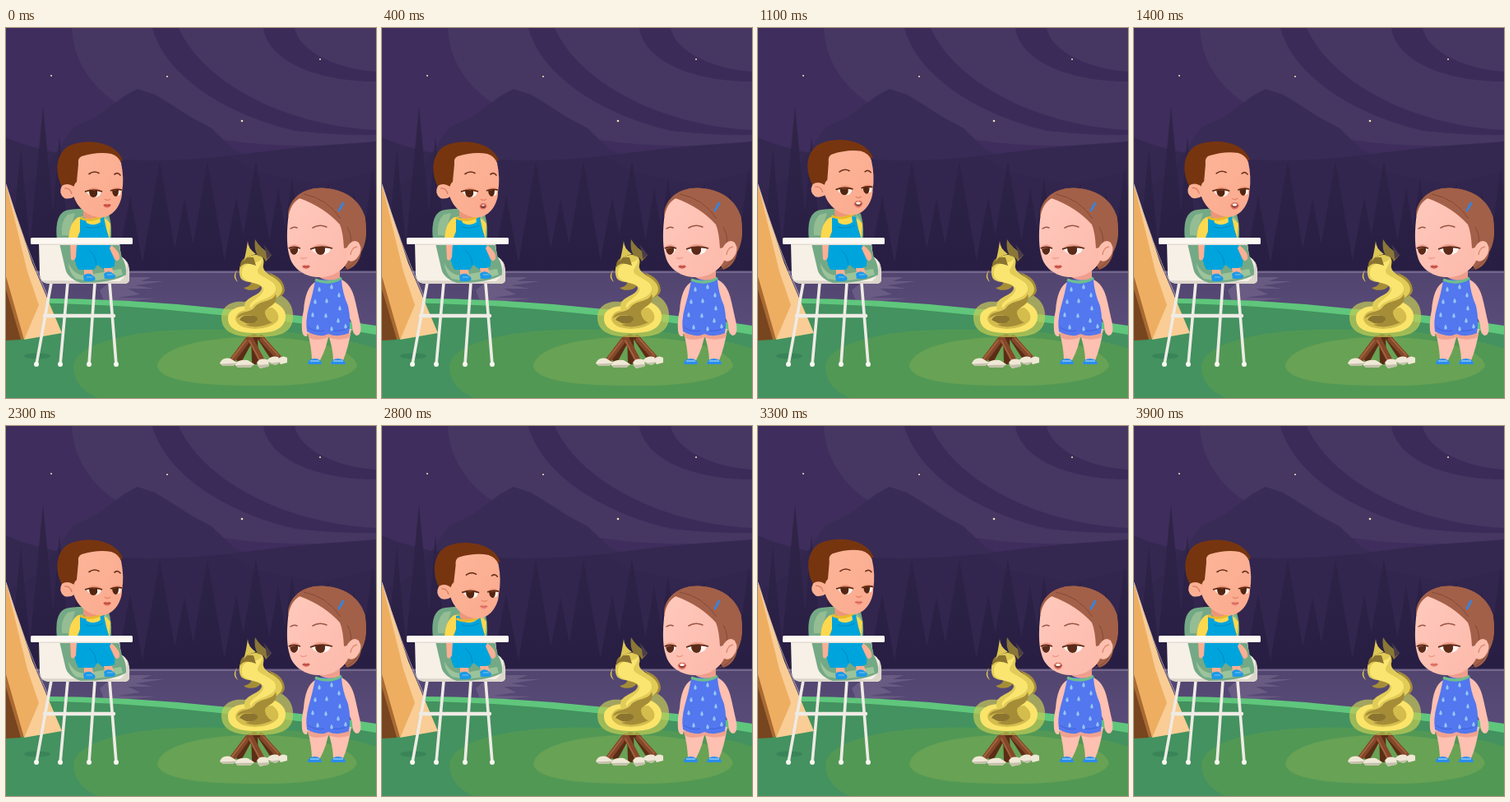
An HTML page for the animation above (4000 ms loop, 450x450 px).

```html
<!DOCTYPE html>
<html lang="en">
<head>
<meta charset="utf-8">
<title>Campfire talk</title>
<style>
html, body { margin: 0; width: 100%; height: 100%; overflow: hidden; background: #3c2d5a; }
svg { display: block; width: 100vw; height: 100vh; }
</style>
</head>
<body>
<svg viewBox="0 0 450 450">
<defs>
  <linearGradient id="haze" x2="0" y2="1"><stop stop-color="#302549"/><stop offset="1" stop-color="#281e43"/></linearGradient>
  <linearGradient id="lake" x2="0" y2="1"><stop stop-color="#51456f"/><stop offset="1" stop-color="#5c4e7d"/></linearGradient>
  <linearGradient id="boySkin" x2="1" y2="1"><stop stop-color="#fcb598"/><stop offset="1" stop-color="#fbaa8f"/></linearGradient>
  <linearGradient id="girlSkin" x2="1" y2="1"><stop stop-color="#ffc9bc"/><stop offset="1" stop-color="#fcb9aa"/></linearGradient>
  <path id="drop" d="M0-3.500C2.300 0 2.300 2.500 0 2.500S-2.300 0 0-3.500Z" fill="#94c4fb"/>
</defs>

<!-- sky -->
<path fill="#3e2d5d" d="M0 0H450V300H0Z"/>
<path fill="#453662" d="M80 0C82 56 124 95 190 120C280 146 370 146 450 140V0Z"/>
<path fill="#3b2b59" d="M178 0C194 58 266 105 352 125Q405 131 450 130V124C350 120 242 72 210 0Z"/>
<path fill="#3b2b59" d="M313 0C318 37 372 65 450 65V53C402 50 357 29 351 0Z"/>
<path fill="#382b55" d="M42 178L82 121L110 108L145 82L160 74L181 81L196 90L224 108L250 122L276 147L305 161V200H42Z"/>
<path fill="#342850" d="M0 133C58 160 172 170 270 156S405 142 450 138V298H0Z"/>
<path fill="#32264e" d="M42 178L62 151Q150 168 270 156L305 175L380 190L450 174V298H0V202Z"/>
<path fill="url(#haze)" id="trees"/>
<g fill="#f3e5b4"><circle cx="55" cy="58" r="1"/><circle cx="196" cy="59" r="1"/><circle cx="287" cy="113" r="1.300"/><circle cx="382" cy="38" r="1"/></g>

<!-- lake and ground -->
<path fill="url(#lake)" d="M0 296H450V385H0Z"/>
<path fill="#73658c" d="M0 295.500H450V298H0Z"/>
<path fill="#7a6c91" d="M134 303H177L164 308H192L157 313L180 317H148L163 324L136 328L182 329L120 334L114 319Z" opacity=".55"/>
<path fill="#5fc67c" d="M0 329Q130 327 260 341Q365 349 450 362V450H0Z"/>
<path fill="#43925f" d="M0 334Q130 334 260 349Q365 358 450 373V450H0Z"/>
<path fill="#529855" d="M82 412C84 383 155 364 260 367C360 366 450 382 474 402V450H112Q83 438 82 412Z"/>
<path fill="#68a254" d="M184 411C188 389 236 376 304 376C372 376 423 391 427 410C422 428 364 436 302 435C236 435 187 429 184 411Z"/>
<ellipse cx="38" cy="399" rx="16" ry="3.500" fill="#347b53" opacity=".6"/>

<!-- tent -->
<path fill="#a96a32" d="M0 296L22 378L0 380Z"/>
<path fill="#77451f" d="M0 318L18 379L0 380Z"/>
<path fill="#eeae62" d="M0 190L32 292L42 338L22 379L0 302Z"/>
<path fill="#f9cd95" d="M0 190L32 286L68 371L22 379L40 337L26 296Z"/>
<path fill="none" stroke="#c4bac2" stroke-width=".8" d="M0 190Q21 260 51 327"/>

<!-- high chair -->
<path fill="#74a986" d="M62 258Q58 223 77 221Q111 217 125 226Q130 243 127 261Z"/>
<path fill="#94bd93" d="M68 252Q66 236 75 227L84 225L76 252ZM119 226L125 233L124 252Z"/>
<g fill="none" stroke="#efebe5" stroke-width="3.600" stroke-linecap="round">
  <path d="M55 310L37 409M75 310L66 409M108 310L101 409M126 310L134 409"/>
  <path stroke-width="4.500" d="M47 350H131"/>
</g>
<g fill="#faf7f1"><circle cx="37" cy="409" r="3"/><circle cx="66" cy="409" r="3"/><circle cx="101" cy="409" r="3"/><circle cx="134" cy="409" r="3"/></g>
<path fill="#f7f0e6" d="M40 262H138L140 278Q150 283 150 299V306Q150 311 143 311H54Q42 311 41 300Z"/>
<path fill="#dcd6cb" d="M138 308Q147 304 147 284Q151 290 150 306Q150 311 143 311H54Q46 311 43 307Z"/>
<path fill="#74a986" d="M65 262H137L141 279Q147 288 146 300Q131 310 91 310Q74 304 72 292Z"/>
<path fill="#9cc39a" d="M76 286Q82 300 96 301L140 293L142 300Q109 311 85 305Q76 297 76 286Z"/>

<!-- seated boy -->
<path fill="#fcd84f" d="M88 230Q77 236 76 257H86L92 242L120 240L126 257L127 238Q119 228 108 228Z"/>
<path fill="#00a4dc" d="M90 231L96 230L98 237Q108 242 115 236L114 229L119 230L122 244L127 262Q134 276 132 290L119 294L111 288L107 294L88 294Q81 282 84 266L90 248Z"/>
<path fill="none" stroke="#0089c4" d="M101 270Q109 276 110 288M97 242Q108 245 118 240"/>
<path fill="#fbaf93" d="M78 263H86L85 279Q82 285 79 281ZM128 264Q140 273 138 281Q134 286 131 279L126 268ZM95 294H105L106 301H95ZM119 292H129L131 298H120Z"/>
<g fill="#1e9ae6"><path d="M94 302Q96 298 103 299L108 303Q111 308 102 308H95Z"/><path d="M119 299Q122 295 128 297L133 301Q134 305 127 305H120Z"/></g>
<path stroke="#7cc8f2" d="M98 303H105M123 300H130"/>
<rect x="30" y="255" width="124" height="8" rx="1.500" fill="#fdf8f2"/>
<path fill="#e3ddd4" d="M40 262.500H138V264H40Z"/>
<g id="boy">
  <path fill="#ec9679" d="M94 217H117V230Q105 237 94 230Z"/>
  <path fill="none" stroke="#e8b92f" stroke-width="3" d="M90 231Q103 237 117 229"/>
  <path fill="#77350f" d="M68 193C57 172 62 146 83 141C98 136 133 137 142 161L132 166L88 190L81 197Z"/>
  <path fill="url(#boySkin)" d="M88 166Q87 158 92 156Q112 150 128 153Q137 156 140 164Q144 183 141 200C141 213 132 228 119 230C103 232 86 220 82 203Q81 190 86 187Z"/>
  <path fill="#fbb094" d="M84 194Q75 187 68 192Q63 201 71 207Q78 209 85 204Z"/>
  <path fill="none" stroke="#db7c60" stroke-width="1.200" d="M80 202Q78 194 71 195"/>
  <g fill="none" stroke="#6a3018" stroke-width="1.600" stroke-linecap="round"><path d="M101 177.500Q107 173 113 176.500M132 178Q136 175 139 179"/></g>
  <g fill="#fff5ee"><path d="M98 199H116Q115 206 107 206Q100 204 98 199Z"/><path d="M128 198H140L139 203Q132 206 128 198Z"/></g>
  <path fill="#54240f" d="M101 198H111Q112 206 106 206Q101 205 101 198ZM129 197H137Q137 205 133 205Q129 203 129 197Z"/>
  <path fill="#ee9577" d="M97 199Q106 190 117 198Q107 196 97 199ZM127 197Q134 191 141 196L128 198Z"/>
  <path fill="none" stroke="#54240f" stroke-width="1.600" d="M96 199Q107 195 117 199M127 198Q134 195 141 197"/>
  <path fill="none" stroke="#e68467" stroke-width="1.300" d="M120 208Q123 211 127 208"/>
  <g id="boyMouth" transform="translate(123 215.500)"></g>
</g>

<!-- fire -->
<g stroke-linecap="round">
  <path stroke="#5b2d16" stroke-width="8" d="M297 378L284 402M302 376L303 405M310 377L325 400"/>
  <path stroke="#84482a" stroke-width="7" d="M294 379L276 403M312 379L331 400M297 378L312 406"/>
  <path stroke="#a9683f" stroke-width="1.500" d="M292 380L275 402M313 378L331 398M296 380L309 405"/>
</g>
<g fill="#f0e8d6"><path d="M260 408Q263 400 273 402L281 407L276 411H264ZM278 409Q282 403 294 404L302 409L297 413H282ZM305 407Q309 400 319 404L320 411L309 414ZM317 405Q322 398 331 400L334 406L328 410ZM330 403Q336 397 342 401V407L334 409Z"/></g>
<path fill="#c4c0ab" d="M261 408.500L281 407.500L276 411H264ZM279 410L302 409.500L297 413H282ZM305 410L320 409L319 412L309 414ZM319 408L334 406L328 410Z"/>
<path fill="#c3cc56" opacity=".7" d="M262 352C262 338 275 331 290 333L326 321C345 328 350 340 349 353C348 372 330 376 305 376C278 376 262 370 262 352Z"/>
<path fill="#fbe46a" d="M270 353C270 342 282 338 296 338L325 333Q341 340 340 352C338 368 322 371 304 371C282 371 270 366 270 353Z"/>
<path fill="#d4bd4d" d="M279 353Q281 343 296 343L324 340Q333 346 331 355Q324 365 303 366Q280 365 279 353Z"/>
<path fill="#a58d38" d="M287 294C291 300 303 302 308 307C317 316 297 323 289 316Q299 314 299 307Q288 303 287 294ZM318 297Q338 303 339 319Q337 329 325 327Q332 319 328 310Q324 301 318 297Z"/>
<path fill="#e2cc58" d="M285 303C280 287 292 274 309 276Q315 281 313 288C310 300 335 303 336 317C336 333 309 330 312 344L300 360Q289 346 290 337C292 326 311 325 311 316C309 307 288 312 285 303Z"/>
<path fill="#fbe571" d="M287 301Q285 288 298 286Q310 285 312 279C311 292 301 294 309 300C318 306 329 309 328 318C325 331 303 329 298 341C292 334 309 329 313 320C317 309 290 312 287 301Z"/>
<path fill="#a58d38" d="M281 353C283 344 296 347 302 340C309 330 325 334 328 323C333 339 314 338 315 347Q317 356 324 358Q305 367 291 361Q308 357 302 351Q292 346 281 353Z"/>
<path fill="#8a742f" d="M284 355Q288 348 299 350C311 350 307 361 292 359ZM285 291Q290 283 304 289L301 279Q284 277 285 291Z"/>
<path fill="#8a7737" d="M303 257Q309 268 323 276L316 284Q314 278 306 277Q301 268 303 257Z"/>
<path fill="#4a3c49" d="M313 263Q319 270 323 276L317 281Q317 272 313 263Z"/>
<path fill="#dcc654" d="M294 259Q294 268 304 275Q291 278 289 284Q292 274 294 259ZM281 294Q277 302 282 309Q274 303 281 294Z"/>

<!-- girl -->
<g fill="#fdc0b1">
  <path d="M366 366H394Q390 390 382 404H372Q372 390 366 366ZM390 366H420Q416 391 410 404H398Q398 390 390 366Z"/>
  <path d="M376 309Q364 316 362 343Q359 357 360 368Q361 376 366 375L369 361L378 330ZM405 305Q420 309 425 333L431 360Q433 374 426 374Q421 372 421 360L411 336Z"/>
</g>
<path fill="#f0a290" d="M367 371H393L391 377Q376 381 369 377ZM391 371H419L417 377Q402 381 392 376Z"/>
<g fill="#2a8cec"><path d="M367 409Q367 402 376 402Q384 403 384 409ZM395 409Q396 402 404 402Q413 403 413 409Z"/></g>
<path stroke="#8fcaf8" stroke-width="1.500" d="M370 405H381M398 405H410"/>
<path fill="#5277ee" d="M376 308Q394 302 408 306Q409 322 416 338Q420 356 417 371Q404 377 392 372L387 374Q376 375 366 369Q364 356 368 341Q373 324 376 308Z"/>
<path fill="none" stroke="#3f62d8" d="M367 364Q378 371 387 368M393 367Q406 371 417 364"/>
<g id="drops"></g>
<path fill="none" stroke="#6cbf8c" stroke-width="3.500" d="M376 306Q393 313 408 304"/>
<g id="girl">
  <path fill="#ee9f8d" d="M380 290H406V304Q393 310 381 303Z"/>
  <path fill="#a36048" d="M343 229C344 206 364 192 389 195C419 197 439 217 438 244Q439 260 432 273Q429 289 415 294L400 270Z"/>
  <path fill="url(#girlSkin)" d="M343 233Q345 214 357 207Q386 212 406 228L411 257Q420 261 418 278C413 295 396 304 379 303C361 302 348 291 345 278Q340 263 343 233Z"/>
  <path fill="#a36048" d="M343 226C345 206 363 193 389 195C415 197 432 214 437 231L427 264L411 268Q410 248 406 239Q387 218 357 207Q347 212 343 226Z"/>
  <g fill="none" stroke="#854936" stroke-width="1"><path d="M362 202Q390 207 407 232M428 279Q421 291 410 294M415 242Q421 252 419 262"/></g>
  <path fill="#fdbfae" d="M415 266Q422 255 429 261Q435 270 427 280Q420 287 414 281Z"/>
  <path fill="none" stroke="#df8b76" stroke-width="1.300" d="M419 276Q420 267 427 266"/>
  <path stroke="#2f86e8" stroke-width="2.600" stroke-linecap="round" d="M405 222L410 213"/>
  <path fill="none" stroke="#9a5642" stroke-width="1.500" stroke-linecap="round" d="M346 244Q350 241 354 243M373 243Q381 238 390 242"/>
  <g fill="#fff7f3"><path d="M344 268H357Q357 275 350 276Q346 274 344 268Z"/><path d="M371 268H395Q393 276 382 276Q374 274 371 268Z"/></g>
  <path fill="#5b2a18" d="M345 267H355Q356 275 350 276Q345 274 345 267ZM376 267H388Q389 276 382 276Q376 275 376 267Z"/>
  <path fill="#f0a18e" d="M343 267Q350 260 358 266L344 269ZM370 268Q382 258 396 267Q382 265 370 269Z"/>
  <path fill="none" stroke="#5b2a18" stroke-width="1.800" d="M344 268Q350 265 358 268M370 269Q382 264 397 268"/>
  <path fill="none" stroke="#ef9a87" stroke-width="1.300" d="M358 279Q361 282 366 279"/>
  <g id="girlMouth" transform="translate(365 290)"></g>
</g>
</svg>
<script>
const $ = id => document.getElementById(id);
const LOOP = 4000, NOD = 2000, STEP = 100;

// peak x, peak y, half width at the shore
const firs = [[18,145,14],[45,95,19],[65,132,14],[89,177,15],[116,195,16],[151,203,17],[187,161,23],
  [217,207,17],[245,161,23],[280,205,17],[304,161,23],[331,194,17],[348,181,16],[392,188,17],[423,198,14],[446,170,17]];
$("trees").setAttribute("d", firs.map(([x, y, w]) => `M${x} ${y}L${x + w} 296H${x - w}Z`).join(""));

const drops = [[381,318],[396,315],[405,325],[376,333],[390,332],[406,341],[373,349],[389,350],[404,356],[379,364],[396,366],[413,363]];
$("drops").innerHTML = drops.map(([x, y]) => `<use href="#drop" x="${x}" y="${y}"/>`).join("");

const lips = (fill, line) =>
  `<path fill="${fill}" d="M-5 0Q-2-3 0-1Q3-3 5 0Q3 3 0 3Q-3 3-5 0Z"/><path fill="none" stroke="${line}" d="M-4 0Q0 1 4 0"/>`;
const mouths = {
  r: lips("#ee8577", "#c95f54"),
  m: lips("#e0665a", "#a5413a"),
  e: `<path fill="#dc7163" d="M-5.500 1Q-2-4 0-2Q3-4 5.500 1Q4 6 0 6Q-4 6-5.500 1Z"/>
      <path fill="#86382f" d="M-4 1Q0-2 4 1Q3 4 0 4Q-3 4-4 1Z"/><path fill="#fff4ea" d="M-3 0Q0-2 3 0L2 2H-2Z"/>`,
  o: `<path fill="#dc7163" d="M-4.500 1Q-2-4 0-2Q3-4 4.500 1Q4 5 0 5Q-4 5-4.500 1Z"/>
      <ellipse cy="1.500" rx="3" ry="2" fill="#86382f"/><path fill="#fff4ea" d="M-2 0Q0-1 2 0L1.500 1H-1.500Z"/>`
};

// one mouth shape per step
const speech = {
  boyMouth: "mmeeommeooeemmeeommeeomm" + "r".repeat(16),
  girlMouth: "m".repeat(25) + "eoeeommeeeomrrr"
};

// time, dx, dy, turn: dip, rise, settle
const nod = [[0,0,0,0],[600,0,0,0],[800,.6,3.6,1],[1100,-.8,-2.6,-1.3],[1350,-.5,-.8,-.6],[1600,0,0,0],[NOD,0,0,0]];

function pose(t) {
  const i = nod.findIndex(k => k[0] > t);
  const a = nod[i - 1], b = nod[i];
  const u = (t - a[0]) / (b[0] - a[0]), s = u * u * (3 - 2 * u);
  return [1, 2, 3].map(j => a[j] + (b[j] - a[j]) * s);
}

const shown = {};
function render(time) {
  const i = Math.floor(time % LOOP / STEP);
  const [dx, dy, turn] = pose(i * STEP % NOD);
  $("boy").setAttribute("transform", `translate(${dx} ${dy}) rotate(${turn} 104 226)`);
  for (const id in speech) {
    const shape = speech[id][i];
    if (shown[id] !== shape) $(id).innerHTML = mouths[shown[id] = shape];
  }
}

const start = performance.now();
function tick() {
  render(performance.now() - start);
  requestAnimationFrame(tick);
}
tick();
</script>
</body>
</html>
```
